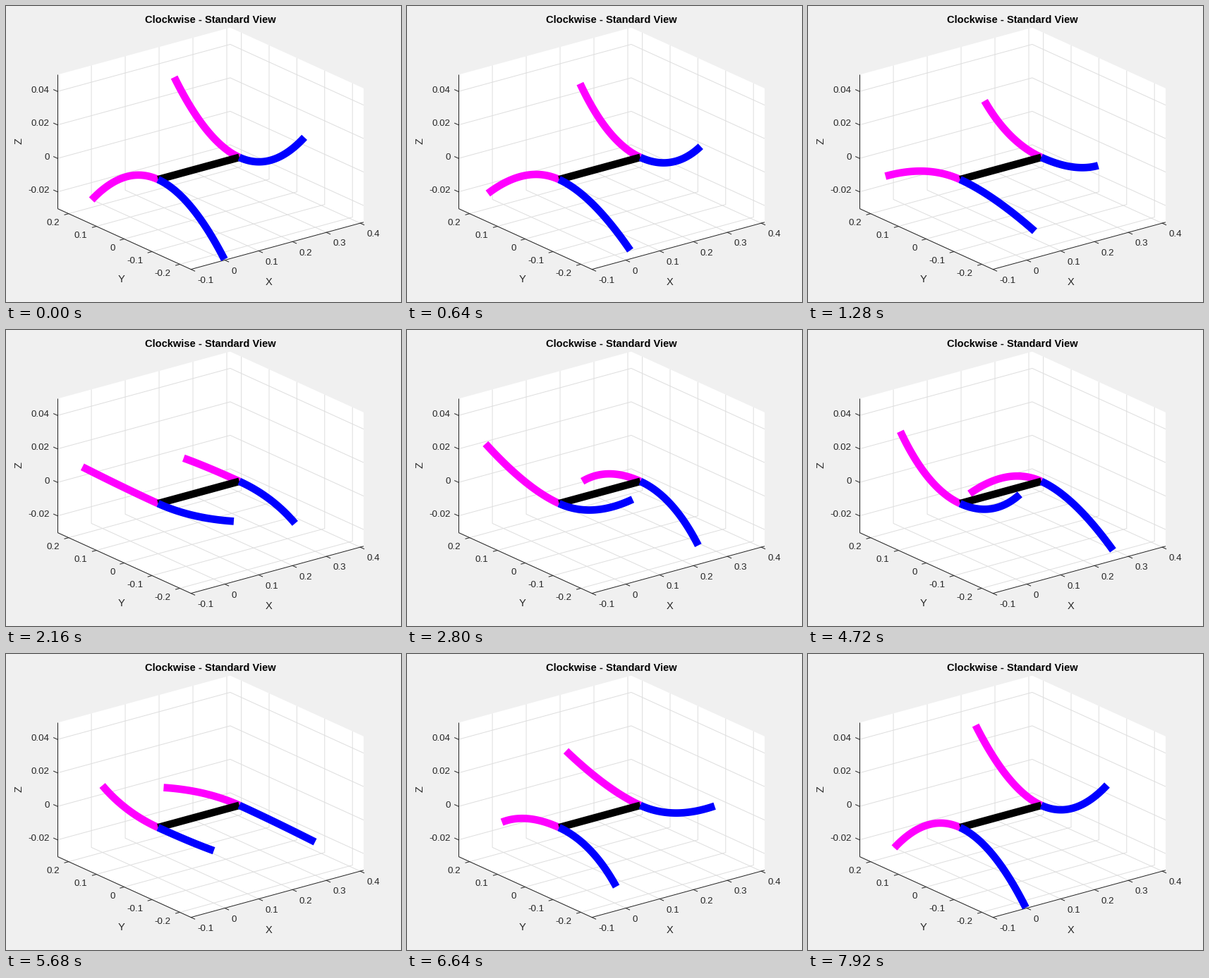
Write a matplotlib script that moves like this. It is 560 px wide and 420 px high and loops after 8 s.

```python
import numpy as np
import matplotlib.pyplot as plt
from matplotlib.animation import FuncAnimation

W, H = 560, 420
FRAMES, INTERVAL = 100, 80
PT = 0.72  # points per pixel at 100 dpi
INK = "#262626"
GRID = "#dedede"

# Orthographic projection: pixel position of the origin and pixels per unit
ORIGIN = np.array([215.6, 246.2])
EX = np.array([480.0, -131.0])
EY = np.array([-394.0, -179.5])
EZ = np.array([0.0, -2375.0])

X0, X1 = -0.1, 0.41
Y0, Y1 = -0.24, 0.24
Z0, Z1 = -0.03, 0.05
X_TICKS = [-0.1, 0, 0.1, 0.2, 0.3, 0.4]
Y_TICKS = [-0.2, -0.1, 0, 0.1, 0.2]
Z_TICKS = [-0.02, 0, 0.02, 0.04]

SPAN = 0.2365  # wing reach along Y
SWING = 0.03   # tip travel along X and Z
BODY = 0.24
THICK = 10.67

plt.rcParams["font.family"] = "Liberation Sans"
plt.rcParams["path.simplify"] = False

fig = plt.figure(figsize=(W / 100, H / 100), dpi=100, facecolor="#f0f0f0")
ax = fig.add_axes([0, 0, 1, 1])
ax.set_xlim(0, W)
ax.set_ylim(H, 0)
ax.axis("off")


def project(x, y, z):
    """Map points in space to columns of pixel x and y."""
    x, y, z = np.broadcast_arrays(x, y, z)
    return (ORIGIN[:, None] + np.outer(EX, x) + np.outer(EY, y)
            + np.outer(EZ, z))


def line(points, color, width, order):
    px, py = project(*np.array(points, float).T)
    return ax.plot(px, py, color=color, lw=width * PT, zorder=order,
                   solid_capstyle="butt", solid_joinstyle="round")[0]


def label(x, y, text, size=13.33, ha="center", **style):
    style.setdefault("color", INK)
    ax.text(x, y, text, fontsize=size * PT, ha=ha, va="baseline",
            zorder=4, **style)


def tick(value, at, direction, shift, ha):
    """Draw a short outward mark and its number."""
    px, py = project(*at)[:, 0]
    step = 6 * direction / np.hypot(*direction)
    ax.plot([px, px + step[0]], [py, py + step[1]], color=INK,
            lw=PT, zorder=3)
    label(px + shift[0], py + shift[1], f"{value:g}", ha=ha)


def draw_box():
    outline = project([X0, X1, X1, X1, X0, X0],
                      [Y1, Y1, Y0, Y0, Y0, Y1],
                      [Z1, Z1, Z1, Z0, Z0, Z0])
    ax.fill(*outline, color="white", lw=0, zorder=0)

    for x in X_TICKS:
        line([(x, Y0, Z0), (x, Y1, Z0), (x, Y1, Z1)], GRID, 1, 1)
        tick(x, (x, Y0, Z0), -EY, (9.6, 19.2), "left")
    for y in Y_TICKS:
        line([(X0, y, Z0), (X1, y, Z0), (X1, y, Z1)], GRID, 1, 1)
        tick(y, (X0, y, Z0), -EX, (-13, 16.5), "right")
    for z in Z_TICKS:
        line([(X0, Y1, z), (X1, Y1, z), (X1, Y0, z)], GRID, 1, 1)
        tick(z, (X0, Y1, z), EY, (-11.4, 1.4), "right")

    line([(X0, Y1, Z1), (X0, Y1, Z0)], INK, 1, 3)
    line([(X0, Y1, Z0), (X0, Y0, Z0), (X1, Y0, Z0)], INK, 1, 3)

    label(289.5, 24.5, "Clockwise - Standard View", 14.67,
          weight="bold", color="black")
    label(372.5, 396.5, "X", 14.67)
    label(163.5, 391.5, "Y", 14.67)
    label(22.5, 191.5, "Z", 14.67, rotation=90, rotation_mode="anchor")


draw_box()
line([(0, 0, 0), (BODY, 0, 0)], "black", THICK, 6)

u = np.linspace(0, 1, 50)
wings = []
for base, phase in ((0, 0), (BODY, np.pi)):
    for side, color, order in ((1, "magenta", 5), (-1, "blue", 7)):
        artist = line([(base, 0, 0)], color, THICK, order)
        wings.append((artist, base, phase, side))


def update(i):
    turn = 2 * np.pi * (i + 1) / FRAMES
    for artist, base, phase, side in wings:
        x = base - side * SWING * np.sin(turn + phase) * u**2
        z = -SWING * np.cos(turn + phase) * u**2
        artist.set_data(*project(x, side * SPAN * u, z))
    return [wing[0] for wing in wings]


anim = FuncAnimation(fig, update, frames=FRAMES, interval=INTERVAL,
                     repeat=True, repeat_delay=0, blit=False)
plt.show()
```
